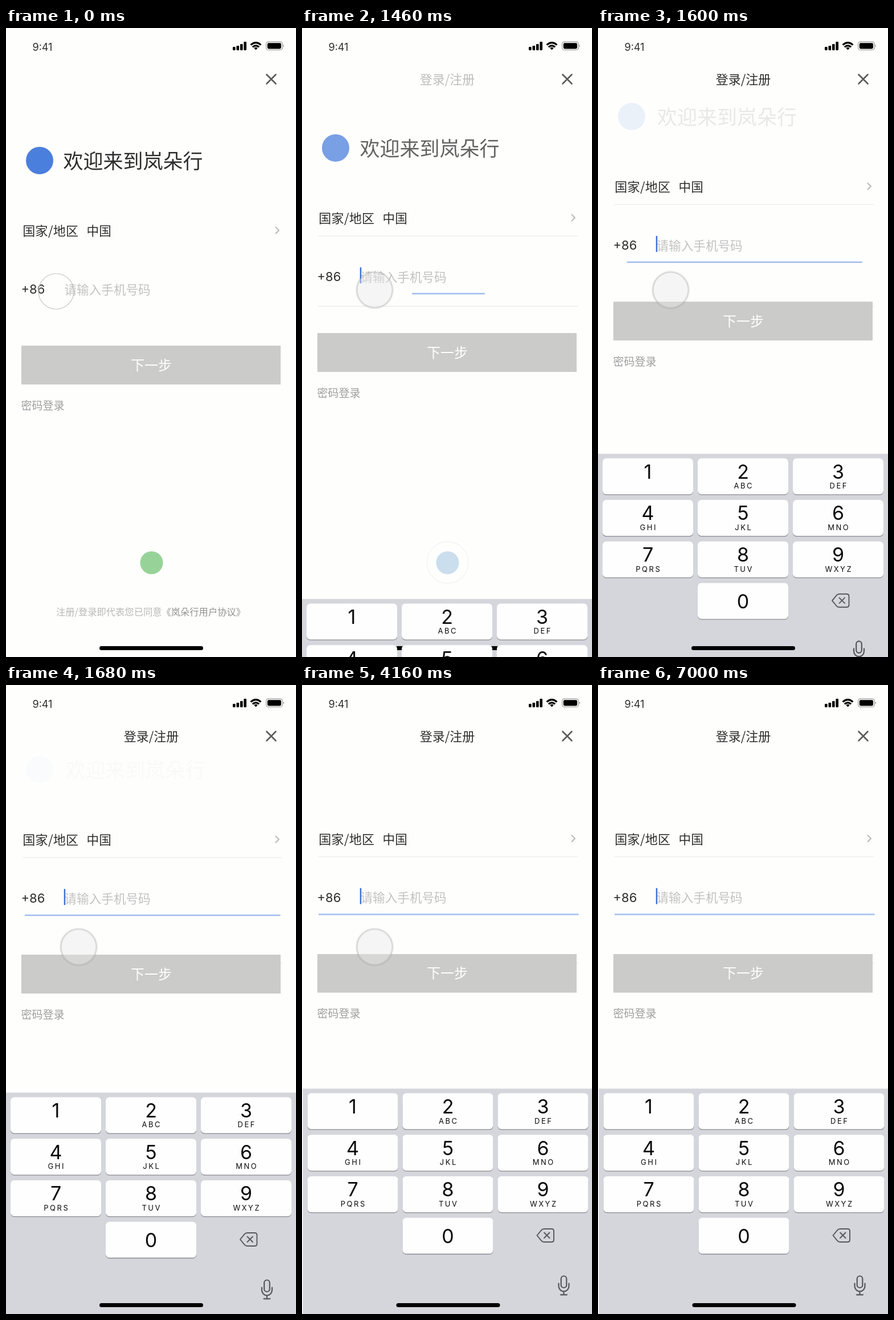
Write an HTML page that moves like this. It is 509x1101 px and loops after 7060 ms.

```html
<!DOCTYPE html>
<html lang="zh-CN">
<head>
<meta charset="utf-8">
<title>登录/注册</title>
<style>
  @property --p { syntax: '<number>'; inherits: true; initial-value: 0; }
  @property --drift { syntax: '<number>'; inherits: true; initial-value: 0; }

  html, body { margin: 0; width: 100%; height: 100%; overflow: hidden; background: #fefefd; }
  svg { display: block; width: 509px; height: 1101px; }
  text { font-family: "Noto Sans CJK SC", "Noto Sans CJK", "Noto Sans CJK JP", sans-serif; font-weight: 300; fill: #2d2d2d; }
  .num { font-family: Inter, Roboto, sans-serif; font-weight: 400; }
  .mid { text-anchor: middle; }
  .line { fill: none; stroke-linecap: round; stroke-linejoin: round; }

  /* --p: 1360 to 1754 ms, --drift: 1920 to 2420 ms */
  #stage { animation: focus 7060ms infinite linear, drift 7060ms infinite linear; }
  @keyframes focus {
    0% { --p: 0; }
    19.263% { --p: 0; animation-timing-function: cubic-bezier(.43, 0, .13, 1); }
    24.844%, 100% { --p: 1; }
  }
  @keyframes drift {
    0%, 27.195% { --drift: 0; }
    34.278%, 100% { --drift: 1.5; }
  }

  .lift { transform: translateY(calc(var(--p) * -85.5px)); }
  .welcome { opacity: calc(1 - var(--p)); }
  .welcome text { transform: translateX(calc(var(--p) * 4px)); }
  .heading { opacity: calc(var(--p) * 1.2); }
  .underline { transform-origin: 257px 487px; transform: scaleX(calc(.03 + .97 * var(--p))); }
  .sheet { transform: translate(calc(var(--drift) * 1px), calc(1101px - var(--p) * 394.5px)); }
  .home { transform: translateX(calc(var(--drift) * 1px)); }

  .focused { animation: show 7060ms infinite step-end; }
  .tint { animation: tint 7060ms infinite step-end; }
  @keyframes show { 0% { opacity: 0; } 19.263%, 100% { opacity: 1; } }
  @keyframes tint { 0% { fill: #97d398; } 19.263%, 100% { fill: #cadeed; } }

  .touch { animation: move 7060ms infinite linear; }
  .press { animation: press 7060ms infinite linear; }
  @keyframes move {
    0% { transform: translate(88px, 461px); }
    5.666% { transform: translate(88px, 461px); animation-timing-function: ease-in-out; }
    9.065% { transform: translate(127.5px, 458.5px); }
    60.34% { transform: translate(127.5px, 458.5px); animation-timing-function: ease-in-out; }
    64.306%, 100% { transform: translate(546px, 458.5px); }
  }
  @keyframes press { 0%, 16.997% { opacity: 0; } 18.414%, 100% { opacity: 1; } }
</style>
</head>
<body>
<svg id="stage" viewBox="0 0 509 1101">
  <!-- status bar -->
  <text class="num" x="46.5" y="39.7" font-size="18">9:41</text>
  <g>
    <rect x="398" y="33" width="4.6" height="6" rx="1.3"/>
    <rect x="404.5" y="31" width="4.6" height="8" rx="1.3"/>
    <rect x="411" y="28" width="4.6" height="11" rx="1.3"/>
    <rect x="417.4" y="24" width="4.6" height="15" rx="1.3"/>
  </g>
  <g fill="none" stroke="#000" stroke-width="3.2">
    <path d="M429.6 29.6Q438.5 21.6 447.4 29.6"/>
    <path d="M432.8 33.4Q438.5 28.4 444.2 33.4"/>
    <path d="M435.3 34.9Q438.5 32.6 441.7 34.9L438.5 38.4Z" fill="#000" stroke="none"/>
  </g>
  <rect x="456.6" y="24.1" width="28.6" height="14.4" rx="4" fill="none" stroke="#999" stroke-width="1.2"/>
  <rect x="458.8" y="26.2" width="24.2" height="10.2" rx="2.3"/>
  <path d="M486.6 28.8q3 2.5 0 5z" fill="#999"/>

  <path class="line" d="M457.5 81.5l16 16m0-16l-16 16" stroke="#5a5a5a" stroke-width="2.6"/>
  <text class="heading mid" x="255" y="98.4" font-size="22" style="font-weight:500">登录/注册</text>

  <rect class="focused" x="29" y="486" width="455.5" height="2" fill="#f0f0f2"/>

  <g class="lift">
    <g class="welcome">
      <circle cx="59" cy="232" r="24" fill="#4b7fdd"/>
      <text x="100.5" y="246.3" font-size="35">欢迎来到岚朵行</text>
    </g>
    <text x="29.3" y="363" font-size="22" letter-spacing=".3">国家/地区</text>
    <text x="141.6" y="363" font-size="21.6">中国</text>
    <path class="line" d="M473.5 348.8l5.5 5.4-5.5 5.4" stroke="#bdbdbd" stroke-width="2.2"/>
    <rect class="focused" x="29" y="385" width="455.5" height="2" fill="#f3f3f5"/>

    <text class="num" x="26.5" y="465.2" font-size="22">+86</text>
    <text x="102.5" y="465.7" font-size="21.6" style="fill:#c2c2c2">请输入手机号码</text>
    <g class="focused">
      <rect x="101.7" y="441" width="2.5" height="28" fill="#3f70d8"/>
      <rect class="underline" x="29" y="485.8" width="456.5" height="2.4" fill="#9db9ee"/>
    </g>

    <rect x="27" y="556" width="455" height="68" fill="#cbcbca"/>
    <text class="mid" x="255" y="598.6" font-size="24" style="fill:#fff">下一步</text>
    <text x="26.5" y="667.7" font-size="19" style="fill:#9e9e9e">密码登录</text>
  </g>

  <circle class="focused" cx="255.5" cy="935.5" r="36.5" fill="none" stroke="#f1f3f4" stroke-width="1.3"/>
  <circle class="tint" cx="255.5" cy="936" r="20"/>
  <text x="88" y="1028.2" font-size="16.3" style="fill:#b8b8b8">注册/登录即代表您已同意<tspan fill="#929292">《岚朵行用户协议》</tspan></text>

  <!-- keyboard -->
  <rect class="sheet" width="512" height="400" fill="#d4d6dc"/>
  <rect class="home" x="164" y="1082" width="182" height="7" rx="3.5"/>
  <g class="sheet">
    <g id="keys"></g>
    <g class="line" stroke="#55575c" stroke-width="1.9">
      <path d="M411 257l7.5-9.2q2-2.3 5-2.3h13q4 0 4 4v15q0 4-4 4h-13q-3 0-5-2.3z"/>
      <path d="M423.5 252l9.5 9.5m0-9.5l-9.5 9.5"/>
      <rect x="453.2" y="328" width="9.6" height="20.5" rx="4.8" stroke-width="2.2"/>
      <path d="M449 341v4.5a9 9.5 0 0 0 18 0v-4.5M458 355v5.5M452.5 360.8h11" stroke-width="2.2"/>
    </g>
  </g>

  <g class="touch">
    <g class="press">
      <circle r="32" fill="none" stroke="#000" stroke-opacity=".07" stroke-width="3"/>
      <circle r="31" fill="#e8e8e9" fill-opacity=".4"/>
    </g>
    <circle r="31" fill="none" stroke="#c3c3c3" stroke-width="1.2"/>
  </g>
</svg>
<script>
  const letters = ['', 'ABC', 'DEF', 'GHI', 'JKL', 'MNO', 'PQRS', 'TUV', 'WXYZ'];

  function key(digit, col, row, label) {
    const x = 8 + col * 167, y = 8 + row * 72.7, mid = x + 79.5;
    const rect = (dy, fill) =>
      `<rect x="${x}" y="${y + dy}" width="159" height="63" rx="6.5" fill="${fill}"/>`;
    const text = (dx, dy, size, gap, s) =>
      `<text class="num mid" x="${mid + dx}" y="${y + dy}" font-size="${size}" letter-spacing="${gap}" style="fill:#0a0a0a">${s}</text>`;
    return rect(1.3, '#898b8f') + rect(0, '#fefefe') +
      text(0, digit ? 35.4 : 44.4, 34, 0, digit) +
      (label ? text(1.25, 53, 13, 2.5, label) : '');
  }

  document.getElementById('keys').innerHTML =
    letters.map((s, i) => key(i + 1, i % 3, Math.floor(i / 3), s)).join('') + key(0, 1, 3);
</script>
</body>
</html>
```
